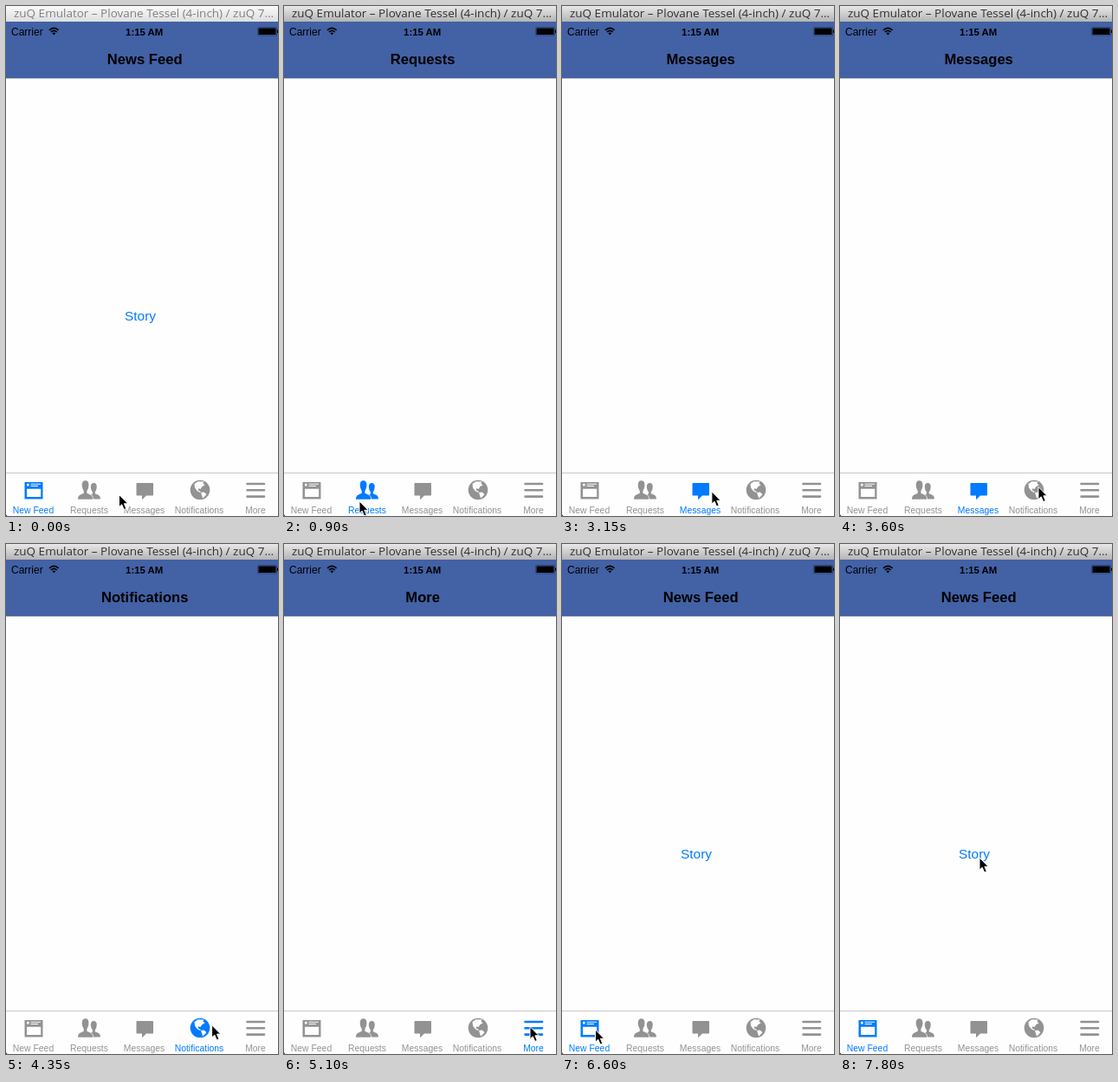
Write an HTML page that moves like this. It is 314 by 587 pixels and loops after 8 s.

```html
<!DOCTYPE html>
<html lang="en">
<head>
<meta charset="utf-8">
<title>Tab bar demo</title>
<style>
  html, body { margin: 0; width: 100%; height: 100%; overflow: hidden; background: #fff; }
  svg { display: block; width: 100%; height: 100%; font-family: "Liberation Sans", Arial, sans-serif; }
  .window { font: 13.5px "Open Sans", sans-serif; }
  .status { font-size: 12px; }
  .time { font-size: 11.4px; font-weight: bold; }
  .heading { font-size: 16.6px; font-weight: bold; }
  .story { font-size: 15.4px; fill: #007aff; }
  .tab { color: #929292; fill: currentColor; font-size: 10.4px; }
  .tab.on { color: #007aff; }
  .mid { text-anchor: middle; }
  .gap { fill: #fefefe; }
</style>
</head>
<body>
<svg viewBox="0 0 314 587" preserveAspectRatio="none">
  <defs>
    <linearGradient id="idle" x2="0" y2="1">
      <stop stop-color="#fafafa"/><stop offset="1" stop-color="#dedede"/>
    </linearGradient>
    <linearGradient id="active" x2="0" y2="1">
      <stop stop-color="#e8e8e8"/><stop offset="1" stop-color="#b4b4b4"/>
    </linearGradient>
  </defs>
  <rect width="314" height="587" fill="#fefefe"/>

  <rect id="bar" width="314" height="18"/>
  <text id="caption" class="window" x="9" y="13">zuQ Emulator – Plovane Tessel (4-inch) / zuQ 7...</text>

  <rect y="18" width="314" height="65" fill="#4361a5"/>
  <rect y="83" width="314" height="1" fill="#c4c8d2"/>
  <text class="status" x="6" y="33.5">Carrier</text>
  <g fill="none" stroke="#000" stroke-width="1.6">
    <path d="M50 27.8Q55.3 22.8 60.6 27.8M51.9 30Q55.3 26.7 58.7 30"/>
    <path d="M53.3 31.2Q55.3 29.6 57.3 31.2L55.3 33.6Z" fill="#000" stroke="none"/>
  </g>
  <text class="time mid" x="159.7" y="33.5">1:15 AM</text>
  <rect x="290.5" y="24.5" width="22" height="9.5" rx="1" fill="none" stroke="#000" stroke-opacity=".4" stroke-width=".7"/>
  <rect x="291.5" y="25.5" width="20" height="7.5"/>
  <rect x="313" y="27.5" width="1" height="3.5"/>
  <text id="heading" class="heading mid" x="160.2" y="67"></text>
  <text id="story" class="story mid" x="155" y="362">Story</text>

  <rect y="537" width="314" height="1" fill="#c8c8c8"/>

  <g class="tab">
    <path d="M21.5 548h21v19.5h-21z"/>
    <path class="gap" d="M24 555.7h16.2v9.3h-16.2zM24 549.8h2.6v2.6h-2.6zM28.5 549.8h11.5v1h-11.5zM28.5 552h8.5v1h-8.5z"/>
    <text class="mid" x="31.5" y="584">New Feed</text>
  </g>
  <g class="tab">
    <path d="M98 567.5V563L100 561.3V559.5Q98 557.5 97.8 553.5Q97.8 549 101.3 549Q104.8 549 104.8 553.5Q104.6 557.5 102.8 559.5V561.3L107 563Q109 564 109 567.5Z"/>
    <path d="M83 567.8Q83 564 85.5 562.8L89.8 560.8V558.3Q87.9 556 87.7 551.5Q87.7 546.3 91.6 546.3Q95.5 546.3 95.5 551.5Q95.3 556 93.4 558.3V560.8L97.7 562.8Q100.2 564 100.2 567.8Z" stroke="#fefefe" stroke-width="1.4" paint-order="stroke"/>
    <text class="mid" x="96" y="584">Requests</text>
  </g>
  <g class="tab">
    <path d="M151.3 549H169.2Q170 549 170 549.8V562.7Q170 563.5 169.2 563.5H162L157 568.3V563.5H151.3Q150.5 563.5 150.5 562.7V549.8Q150.5 549 151.3 549Z"/>
    <text class="mid" x="159.5" y="584">Messages</text>
  </g>
  <g class="tab">
    <circle cx="224" cy="557" r="11.3"/>
    <path class="gap" d="M217.5 550L221.5 547.2L228.5 547.5L227.5 549.5L229.5 551.5L226.5 553L224.5 556L222 555.3L222 557.5L225 559L224 560L220.5 558L218 554.5Z"/>
    <path class="gap" d="M225 560L228.5 559.5L231.5 562L229 565L227 566.5Z"/>
    <text class="mid" x="223" y="584">Notifications</text>
  </g>
  <g class="tab">
    <path d="M278.5 550H298M278.5 557.2H298M278.5 564.6H298" stroke="currentColor" stroke-width="2.6" stroke-linecap="round"/>
    <text class="mid" x="288" y="584">More</text>
  </g>
  <path d="M0 585Q.3 586.5 1.5 587H0Z"/>

  <path id="cursor" d="M0 0V14.2L3.2 11.3L5.7 17L8.3 15.9L5.9 10.3H10.2Z" stroke="#fff"/>
</svg>
<script>
const LOOP = 8000, STEP = 150;
const $ = id => document.getElementById(id);
const tabs = [...document.querySelectorAll('.tab')];
const headings = ['News Feed', 'Requests', 'Messages', 'Notifications', 'More'];

// [time, tab]
const taps = [[0, 0], [900, 1], [2700, 2], [3900, 3], [5100, 4], [6600, 0]];

// [start, steps, x, y]
const moves = [
  [0, 1, 130.5, 562.5], [150, 1, 69, 571.5], [450, 2, 87, 570],
  [1950, 4, 162.5, 560], [3150, 4, 229, 553.5], [4350, 4, 284, 555.5],
  [5550, 5, 38.5, 559], [7050, 6, 161, 361]
];

const smooth = p => p * p * (3 - 2 * p);

function cursorAt(t) {
  let x = 0, y = 0;
  for (const [start, steps, toX, toY] of moves) {
    if (t < start) break;
    const done = Math.min(steps, Math.floor((t - start) / STEP) + 1);
    const p = smooth(done / steps);
    x += (toX - x) * p;
    y += (toY - y) * p;
  }
  return [x, y];
}

function draw(now) {
  const t = now % LOOP;
  const tab = taps.filter(([time]) => time <= t).pop()[1];
  const focused = t >= 900;
  tabs.forEach((el, i) => el.classList.toggle('on', i === tab));
  $('heading').textContent = headings[tab];
  $('story').style.display = tab ? 'none' : '';
  $('bar').setAttribute('fill', focused ? 'url(#active)' : 'url(#idle)');
  $('caption').setAttribute('fill', focused ? '#303030' : '#808080');
  $('cursor').setAttribute('transform', `translate(${cursorAt(t)})`);
}

const begin = performance.now();
function tick() {
  draw(performance.now() - begin);
  requestAnimationFrame(tick);
}
tick();
</script>
</body>
</html>
```
